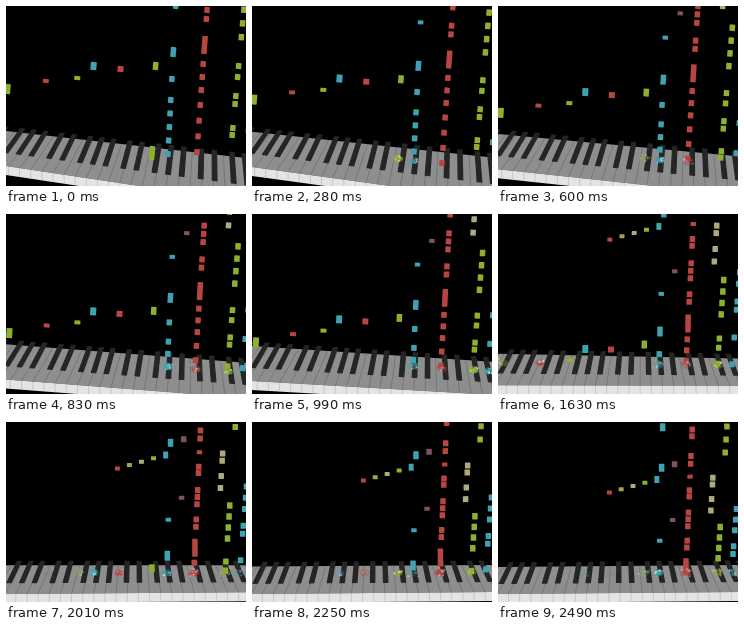
Animation of 240x180 px, one loop 2.99 s. Source, as an HTML page:

```html
<!DOCTYPE html>
<html lang="en">
<head>
<meta charset="utf-8">
<title>Falling notes piano</title>
<style>
html, body { margin: 0; width: 100%; height: 100%; overflow: hidden; background: #000; }
svg { display: block; width: 100vw; height: 100vh; }
</style>
</head>
<body>
<svg id="stage" viewBox="0 0 240 180" preserveAspectRatio="none"></svg>
<script>
const stage = document.getElementById('stage');
const LOOP = 2990, STEPS = 32, STEP_MS = 79.1, FIRST_MS = 30;
const PITCH = 10.15, FIRST_C = -30.3;      // white key width, left edge of the lowest C
const HORIZON = 512, FALL = .0085;         // notes approach HORIZON exponentially
const RED = '#b74643', TEAL = '#3fa2b2', GREEN = '#8db02e', PALE = '#adaa7c', MAUVE = '#80506a', OLIVE = '#a5a34a';

const mix = (a, b, f) => a + (b - a) * f;
const n = v => v.toFixed(2);

function random(seed) {
  const v = Math.sin(seed * 127.1 + 3.7) * 43758.5453;
  return v - Math.floor(v);
}

// Notes: x on the keyboard, colour, width, start height, length.
const score = [];

function run(x, color, first, count = 1, gap = 0, length = 6, width = 5.5) {
  for (let i = 0; i < count; i++) score.push({ x, color, width, y: first + i * gap, length });
}

run(5, GREEN, 83, 1, 0, 10, 6);
run(42, RED, 75, 1, 0, 4, 6);
run(72, GREEN, 72, 1, 0, 4, 6);
run(87.5, TEAL, 60, 1, 0, 8, 6);
run(113, RED, 63, 1, 0, 6, 6);
run(146, GREEN, 60, 1, 0, 8);
run(146, GREEN, 147, 1, 0, 14);

run(161, TEAL, -148, 2, 53, 8);
run(161, TEAL, 1, 1, 0, 4);
run(161, TEAL, 46, 1, 0, 10);
run(161, TEAL, 73);
run(161, TEAL, 94, 5, 13.5);

run(173, MAUVE, -98);
run(173, MAUVE, -25, 1, 0, 4);

run(188, RED, -142, 2, 9);
run(188, RED, -107, 2, 10);
run(188, RED, -80, 1, 0, 4);
run(188, RED, -62, 2, 8);
run(188, RED, -33, 3, 9);
run(188, RED, 4, 2, 9);
run(188, RED, 39, 1, 0, 18);
run(188, RED, 58, 3, 13);
run(188, RED, 99, 4, 15.7);

run(209.5, PALE, -76, 2, 9);
run(209.5, PALE, -48, 2, 15);

run(219.5, GREEN, -142, 3, 17);
run(219.5, GREEN, -10, 4, 13.7, 6.5);
run(219.5, GREEN, 60, 2, 11);
run(219.5, GREEN, 90, 2, 8);
run(219.5, GREEN, 122, 2, 7);

run(234, TEAL, -32, 3, 14);
run(234, TEAL, 17, 2, 10);
run(234, TEAL, 60, 3, 32);

// the rising scale
[RED, OLIVE, PALE, GREEN, TEAL].forEach((color, i) =>
  run(112 + 11.2 * i, color, -68.5 - 2.9 * i, 1, 0, i === 4 ? 7 : 4, 5));

// The camera eases from a turned view to a frontal one.
function pose(step) {
  const s = step / STEPS;
  const r = (1 + Math.cos(Math.PI * s)) / 2, q = r * r;
  return {
    step,
    backL: 145 - 20 * r,
    backR: 143 + 9 * r ** 1.4,
    frontL: 172 - 12 * q,
    frontR: 170 + 26 * q,
    driftL: 11 * (1 - r) - 6 * Math.max(0, Math.sin(2 * Math.PI * s)),
    driftR: -7 * (1 - r) - 2.5 * Math.sin(Math.PI * s),
    spread: .07 * q,
    lean: .015 + .026 * r,
    vanish: 122 + 83 * r
  };
}

const backY = (p, x) => mix(p.backL, p.backR, x / 240);
const frontY = (p, x) => mix(p.frontL, p.frontR, x / 240);
const baseX = (p, c) => c + Math.max(0, c - 145) * p.spread;

// depth 0 is the far edge of the keys, 1 the near edge
function keyPoint(p, c, depth, drop = 0) {
  const b = baseX(p, c);
  const x = b + (depth - .3) * (b - p.vanish) * .14;
  return [x, mix(backY(p, x), frontY(p, x), depth) + drop];
}

const poly = (points, fill, extra = '') =>
  `<polygon points="${points.map(q => q.map(n).join()).join(' ')}" fill="${fill}" ${extra}/>`;

const line = (a, b, color, width) =>
  `<line x1="${n(a[0])}" y1="${n(a[1])}" x2="${n(b[0])}" y2="${n(b[1])}" stroke="${color}" stroke-width="${width}"/>`;

function keyboard(p) {
  const at = (c, depth, drop) => keyPoint(p, c, depth, drop);
  const L = -30, R = 300, face = 9;
  const rounded = 'stroke="#252525" stroke-width="1.2" stroke-linejoin="round"';
  let out = poly([at(L, 0), at(R, 0), at(R, 1), at(L, 1)], '#8e8e8e');
  out += poly([at(L, 1), at(R, 1), at(R, 1, face), at(L, 1, face)], '#e4e4e4');
  let blacks = '';
  for (let i = 0; i * PITCH + FIRST_C < R; i++) {
    const c = FIRST_C + i * PITCH, degree = i % 7;
    out += line(at(c, 0), at(c, 1), '#6c6c6c', .7);
    out += line(at(c, 1), at(c, 1, face), '#b4b4b4', .6);
    if (degree === 0 || degree === 3) continue;
    // black keys stand slightly apart from the middle of their group
    const mid = c + (degree < 3 ? (degree - 1.5) * 2.4 : (degree - 5) * 2);
    const a = mid - 2.1, b = mid + 2.1;
    blacks += poly([at(a, 0, -4), at(b, 0, -4), at(b, .61), at(a, .61)], '#252525', rounded);
  }
  return out + blacks;
}

function sparks(x, y, color, age, seed) {
  const fade = 1 - age / 5;
  let out = `<ellipse cx="${n(x)}" cy="${n(y)}" rx="5" ry="3.5" fill="${color}" opacity="${n(fade * .4)}"/>`;
  for (let i = 0; i < 10; i++) {
    const s = seed * 31 + i * 2.3;
    const dx = (random(s) - .5) * (8 + age * 1.5), dy = (random(s + 1) - .5) * (6 + age);
    out += `<circle cx="${n(x + dx)}" cy="${n(y + dy)}" r="${n(.6 + random(s + 2) * .7)}" ` +
      `fill="${i % 3 ? color : '#d8e4dc'}" opacity="${n(fade * .7)}"/>`;
  }
  return out;
}

function notes(p) {
  const shrink = Math.exp(-FALL * p.step);
  const tilt = (p.backR - p.backL) / 6;
  let out = '', glow = '';
  score.forEach(({ x: c, color, width, y: start, length }, i) => {
    const base = baseX(p, c);
    const y = HORIZON - (HORIZON - start) * shrink + mix(p.driftL, p.driftR, base / 195);
    const x = base + (145 - y) * (p.lean + .0007 * (c - 145));
    const hit = mix(backY(p, base), frontY(p, base), .34);
    const top = y - length / 2, end = y + length / 2, bottom = Math.min(end, hit);
    if (bottom > top && bottom > -2) {
      out += `<rect x="${n(x - width / 2)}" y="${n(top)}" width="${width}" height="${n(bottom - top)}" rx=".5" ` +
        `fill="${color}" transform="rotate(${n(tilt)} ${n(x)} ${n(y)})"/>`;
    }
    const age = Math.max(0, (top - hit) / 3.4);
    if (end > hit && age < 5) glow += sparks(base, hit - 2, color, age, i);
  });
  return out + glow;
}

let shown = -1;
function draw(t) {
  const step = Math.min(STEPS, Math.max(0, 1 + Math.floor((t - FIRST_MS) / STEP_MS)));
  if (step === shown) return;
  shown = step;
  const p = pose(step);
  stage.innerHTML = '<rect width="240" height="180" fill="#000"/>' + keyboard(p) + notes(p);
}

const begin = performance.now();
function tick() {
  draw((performance.now() - begin) % LOOP);
  requestAnimationFrame(tick);
}
tick();
</script>
</body>
</html>
```
